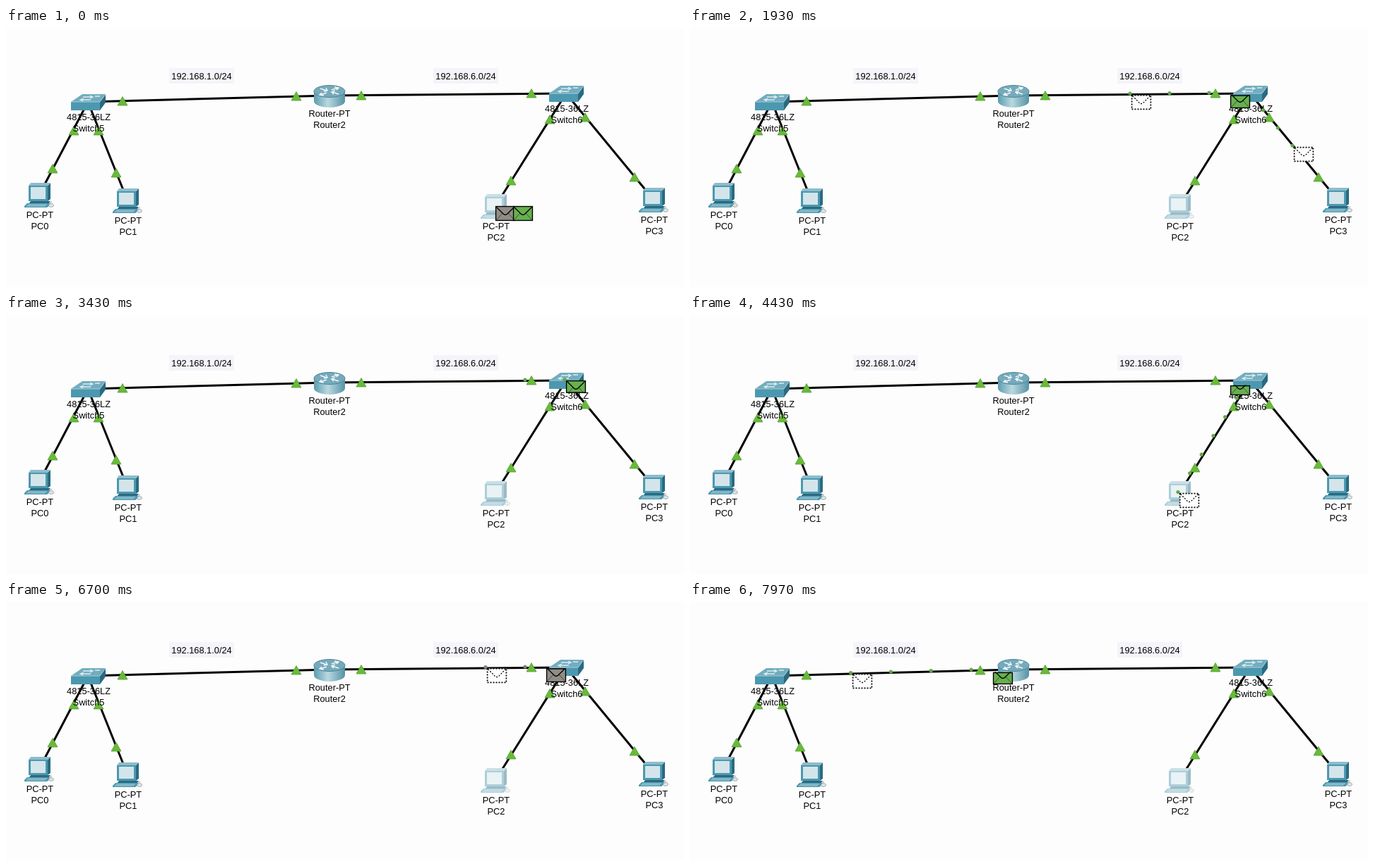
Write an HTML page with a canvas that moves like this. It is 960 px wide and 368 px high and loops after 8000 ms.

```html
<!DOCTYPE html>
<html lang="en">
<head>
<meta charset="utf-8">
<title>Packet simulation</title>
<style>
  html, body { margin: 0; width: 100%; height: 100%; overflow: hidden; background: #fdfdfd; }
  svg, canvas { position: absolute; left: 0; top: 0; width: 960px; height: 368px; }
  text { font: 12.8px "Liberation Sans", Arial, sans-serif; text-anchor: middle; fill: #000; }
</style>
</head>
<body>
<svg viewBox="0 0 960 368">
  <defs>
    <linearGradient id="steel">
      <stop offset="0" stop-color="#5b9db0"/>
      <stop offset=".45" stop-color="#b9d8e0"/>
      <stop offset="1" stop-color="#5593a6"/>
    </linearGradient>
    <g id="switch">
      <path d="M-24 0L-8-11H25L17 0Z" fill="#72adbf"/>
      <path d="M-24 0H17V12H-24Z" fill="#4c98b0"/>
      <path d="M17 0L25-11V1L17 12Z" fill="#2b6a80"/>
      <path d="M-24 0H17L25-11" fill="none" stroke="#a8cdd8"/>
      <path d="M-7-7H6M3-9L7-7L3-5M-10-3H4M-6-5L-11-3L-7-1M10-8H17" fill="none" stroke="#dcecf0" stroke-width="1.3"/>
    </g>
    <g id="router">
      <path d="M-21-6V8A22 9 0 0 0 23 8V-6Z" fill="url(#steel)"/>
      <ellipse cx="1" cy="-6" rx="22" ry="8.5" fill="#75aabb" stroke="#4d8598"/>
      <path d="M-12-10L-3-7M-7-6L-2-7L-4-11M14-2L5-5M9-7L4-5L7-2M4-8L13-11M8-12L14-11L11-8M-3-4L-12-1M-7 0L-13-1L-10-4" fill="none" stroke="#f2f8fa" stroke-width="1.5"/>
    </g>
    <g id="pc">
      <path d="M12-13L16-17V6L12 9Z" fill="#2b6a80"/>
      <path d="M-15-13L-12-17H16L12-13Z" fill="#8dbccb"/>
      <path d="M-15-13H12V9H-15Z" fill="#4c98b0"/>
      <path d="M-12-11H9V6H-12Z" fill="#d3e5ea"/>
      <path d="M-12 9H16L13 13H-15Z" fill="#2b6a80"/>
      <path d="M-17 12H15V15L11 18H-21V16Z" fill="#4c98b0"/>
      <path d="M-16 14H11M-18 16H9" stroke="#b5d4de" stroke-width="1"/>
      <path d="M15 12L18 10" stroke="#8a999f"/>
      <ellipse cx="17" cy="15" rx="3.5" ry="2.3" fill="#e2e8ea" stroke="#8a999f" stroke-width=".8"/>
    </g>
    <path id="up" d="M0-6.5L7 6H-7Z" fill="#68bb38" stroke="#559c33" stroke-width=".8"/>
  </defs>
  <g id="links" stroke="#000" stroke-width="3"></g>
  <g id="devices"></g>
  <g id="lights"></g>
  <g id="labels"></g>
</svg>
<canvas id="packets" width="960" height="368"></canvas>

<script>
const LOOP = 8000, TICK = 1000 / 30, STEPS = 6;
const ENV_W = 27, ENV_H = 20, SLOT = 28;
const GREEN = { fill: '#68b04f', dot: '#61a848' };
const GRAY = { fill: '#908d86', dot: '#82807a' };

const nodes = {
  sw5: { x: 116, y: 105, icon: 'switch', model: '4815-36LZ', name: 'Switch5', drop: 26 },
  sw6: { x: 793, y: 93, icon: 'switch', model: '4815-36LZ', name: 'Switch6', drop: 26 },
  router: { x: 457, y: 96, icon: 'router', model: 'Router-PT', name: 'Router2', drop: 30 },
  pc0: { x: 47, y: 237, icon: 'pc', model: 'PC-PT', name: 'PC0', drop: 33 },
  pc1: { x: 172, y: 245, icon: 'pc', model: 'PC-PT', name: 'PC1', drop: 33 },
  pc2: { x: 693, y: 253, icon: 'pc', model: 'PC-PT', name: 'PC2', drop: 33, dim: true },
  pc3: { x: 917, y: 244, icon: 'pc', model: 'PC-PT', name: 'PC3', drop: 33 }
};
const links = [['sw5', 'router'], ['router', 'sw6'], ['sw5', 'pc0'], ['sw5', 'pc1'], ['sw6', 'pc2'], ['sw6', 'pc3']];
const lights = [[165, 104], [411, 97], [503, 96], [744, 93], [66, 200], [96, 146],
  [156, 206], [131, 146], [770, 130], [715, 217], [820, 127], [890, 212]];

const hops = [
  { at: 630, from: 'pc2', to: ['sw6'], ink: GREEN },
  { at: 1820, from: 'sw6', to: ['router', 'pc3'], ink: GREEN },
  { at: 3020, from: 'router', to: ['sw6'], ink: GREEN },
  { at: 4220, from: 'sw6', to: ['pc2'], ink: GREEN },
  { at: 5445, from: 'pc2', to: ['sw6'], ink: GRAY },
  { at: 6620, from: 'sw6', to: ['router'], ink: GRAY },
  { at: 7820, from: 'router', to: ['sw5'], ink: GREEN }
];

const put = (id, html) => { document.getElementById(id).innerHTML = html; };
const text = (x, y, s) => `<text x="${x}" y="${y}">${s}</text>`;
const ipLabel = (x, s) => `<rect x="${x - 46}" y="57" width="92" height="22" fill="#f4f4fa"/>` + text(x, 73, s);

function buildScene() {
  const all = Object.values(nodes);
  put('links', links.map(([a, b]) => {
    const p = nodes[a], q = nodes[b];
    return `<line x1="${p.x}" y1="${p.y}" x2="${q.x}" y2="${q.y}"/>`;
  }).join(''));
  put('devices', all.map(n => {
    const use = `<use href="#${n.icon}" x="${n.x}" y="${n.y}"`;
    return n.dim
      ? `<rect x="${n.x - 15}" y="${n.y - 17}" width="31" height="30" fill="#fdfdfd"/>${use} opacity=".45"/>`
      : use + '/>';
  }).join(''));
  put('lights', lights.map(([x, y]) => `<use href="#up" x="${x}" y="${y}"/>`).join(''));
  put('labels', all.map(n =>
    text(n.x + 1, n.y + n.drop, n.model) + text(n.x + 1, n.y + n.drop + 16, n.name)
  ).join('') + ipLabel(277, '192.168.1.0/24') + ipLabel(651, '192.168.6.0/24'));
}

const ctx = document.getElementById('packets').getContext('2d');
const clamp = (v, lo, hi) => Math.min(hi, Math.max(lo, v));

// Envelope with its top-left corner at x, y; only rows top..bottom are visible.
function envelope(x, y, fill, top = 0, bottom = ENV_H, ghost = false) {
  if (bottom - top < 1) return;
  ctx.save();
  ctx.translate(Math.round(x) + .5, Math.round(y) + .5);
  ctx.beginPath();
  ctx.rect(-1, top - 1, ENV_W + 2, bottom - top + 2);
  ctx.clip();
  ctx.fillStyle = fill;
  ctx.fillRect(0, top, ENV_W, bottom - top);
  ctx.strokeStyle = '#000';
  ctx.lineWidth = 1.3;
  if (ghost) ctx.setLineDash([2, 2]);
  ctx.beginPath();
  ctx.moveTo(1, 1);
  ctx.lineTo(9, 9);
  ctx.quadraticCurveTo(13.5, 15, 18, 9);
  ctx.lineTo(26, 1);
  ctx.stroke();
  if (!ghost) {
    ctx.lineWidth = .5;
    ctx.beginPath();
    ctx.moveTo(1, 19);
    ctx.lineTo(9, 10);
    ctx.moveTo(26, 19);
    ctx.lineTo(18, 10);
    ctx.stroke();
  }
  ctx.lineWidth = ghost ? 2 : 1.5;
  ctx.strokeRect(0, top, ENV_W, bottom - top);
  ctx.restore();
}

function dot(x, y, color) {
  ctx.fillStyle = color;
  ctx.beginPath();
  ctx.arc(x - 2, y - 1.5, 2.6, 0, 7);
  ctx.fill();
}

function drawHop({ at, from, to, ink }, time) {
  const tick = Math.floor((time - at) / TICK);
  const a = nodes[from];
  const drained = ENV_H * Math.pow(clamp(tick / 12, 0, 1), 1.5);
  const arrived = ENV_H * clamp((tick - 7) / 6, 0, 1);
  envelope(a.x - SLOT, a.y, ink.fill, drained);

  for (const id of to) {
    const b = nodes[id];
    const point = k => [a.x + (b.x - a.x) * k / STEPS, a.y + (b.y - a.y) * k / STEPS];
    const head = Math.min(tick, STEPS);
    if (tick <= 7) envelope(...point(head), '#fff', 0, ENV_H, true);
    envelope(b.x, b.y, ink.fill, 0, arrived);
    for (let k = Math.max(1, tick - 7); k <= head; k++) dot(...point(k), ink.dot);
  }
}

function draw(time) {
  ctx.clearRect(0, 0, 960, 368);
  const hop = hops.filter(h => h.at <= time).pop();
  if (hop) return drawHop(hop, time);
  const { x, y } = nodes.pc2;
  envelope(x, y, GRAY.fill);
  envelope(x + 25, y, GREEN.fill);
}

buildScene();
const start = performance.now();
function loop() {
  draw((performance.now() - start) % LOOP);
  requestAnimationFrame(loop);
}
loop();
</script>
</body>
</html>
```
